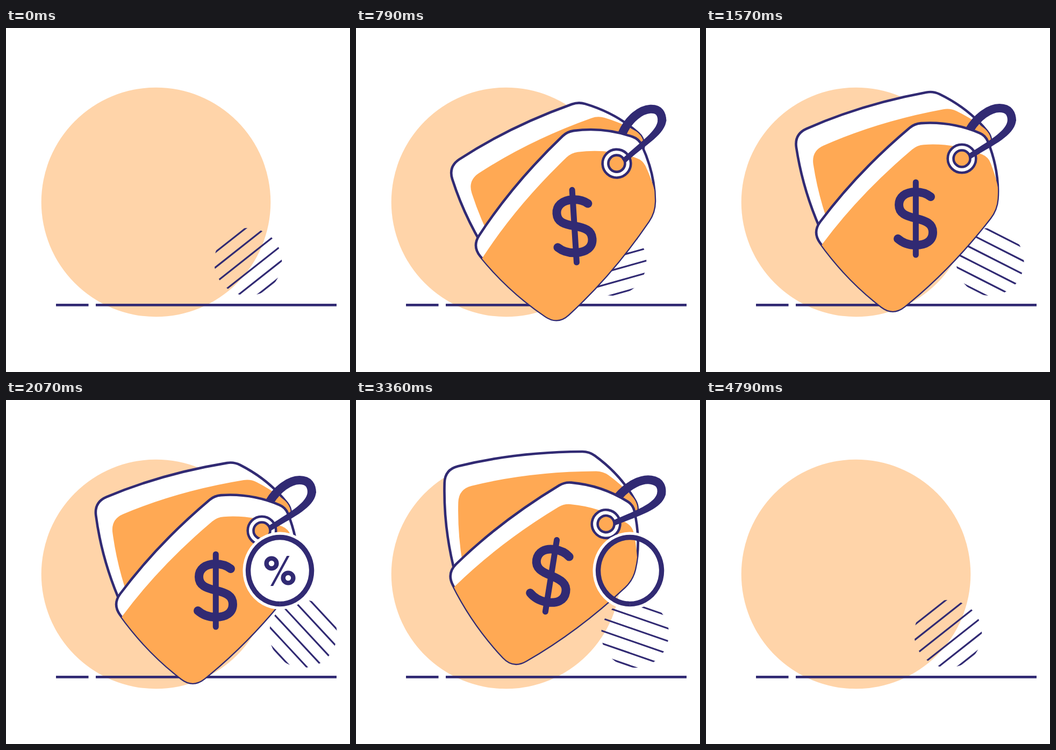
An HTML page that plays this animation: 640x640 px, repeating every 4870 ms.

```html
<!DOCTYPE html>
<html lang="en">
<head>
<meta charset="utf-8">
<title>Price tags</title>
<style>
  html, body { margin: 0; width: 100%; height: 100%; overflow: hidden; background: #fff; }
  svg { display: block; width: 100vw; height: 100vh; }
  .line { fill: none; stroke: #312a73; }
  .ink { fill: #312a73; }
  .paper { fill: #fff; }
  .orange { fill: #ffa954; }
  .edge { stroke: #312a73; stroke-width: 4.6; }
  .round { stroke-linecap: round; }
</style>
</head>
<body>
<svg viewBox="0 0 640 640">
  <defs>
    <path id="frontShape"/>
    <path id="backShape"/>
    <clipPath id="frontClip"><use href="#frontShape"/></clipPath>
    <clipPath id="backClip"><use href="#backShape"/></clipPath>
    <clipPath id="ballClip"><circle r="63"/></clipPath>
  </defs>

  <circle cx="279" cy="324" r="213.3" fill="#ffd4a9"/>
  <path class="line" stroke-width="4.8" d="M93 515.3H153.5M167 515.3H615"/>
  <g id="ball"><path id="hatch" class="line" stroke-width="3.2" clip-path="url(#ballClip)"/></g>

  <g id="tags">
    <g id="back">
      <use href="#backShape" class="paper edge"/>
      <g clip-path="url(#backClip)"><use href="#backShape" class="orange" x="31" y="32"/></g>
    </g>
    <path id="cordTop" class="line" stroke-width="16"/>
    <g id="front">
      <use href="#frontShape" class="paper edge"/>
      <g clip-path="url(#frontClip)"><use href="#frontShape" class="orange" x="5" y="40"/></g>
      <circle class="paper edge" cx="476" cy="243" r="26.3"/>
      <circle class="orange edge" cx="476" cy="243" r="15.5"/>
      <path class="line round" stroke-width="11" d="M390.3 287V422"/>
      <path class="line round" stroke-width="16" d="M418 314C408 306 398 305 390 305C370 305 359 315 359 329C359 345 372 350 390 354C410 359 422 364 422 380C422 396 409 404 390 404C376 404 366 400 357 392"/>
    </g>
    <path id="cordEnd" class="ink"/>
  </g>

  <g id="badge">
    <path class="trim" fill="none" stroke="#fff" stroke-width="8" pathLength="1" d="M509.5 385.5a65 68 0 1 1 .1 0"/>
    <g id="percent">
      <ellipse class="paper" cx="509.5" cy="317.5" rx="59" ry="62"/>
      <circle class="line" stroke-width="8.4" cx="494" cy="304" r="9.4"/>
      <circle class="line" stroke-width="8.4" cx="525" cy="331" r="9.4"/>
      <path class="ink" d="M522.5 290H527.5L497 346H492Z"/>
    </g>
    <path class="line trim" stroke-width="9.4" pathLength="1" d="M509.5 379.5a59 62 0 1 1 .1 0"/>
  </g>
</svg>
<script>
  const LOOP = 4870, FPS = 14;
  const $ = id => document.getElementById(id);
  const set = (id, name, value) => $(id).setAttribute(name, value);
  const smooth = u => u * u * (3 - 2 * u);
  const about = (x, y, s, r = 0) => `translate(${x} ${y}) scale(${s}) rotate(${r}) translate(${-x} ${-y})`;

  // Eased progress from 0 to 1 between two times.
  const ease = (t, from, to) => smooth(Math.min(1, Math.max(0, (t - from) / (to - from))));
  // Rises between a and b, falls between c and d.
  const pulse = (t, a, b, c, d) => ease(t, a, b) - ease(t, c, d);
  // Swings up to `high` at 400 ms, back past rest to `low`, then settles.
  const sway = (t, high, low, turn, end) =>
    high * ease(t, 0, 400) + (low - high) * ease(t, 400, turn) - low * ease(t, turn, end);

  // Closed outline through corners [x, y, rounding], each side bowed outwards.
  function outline(corners, bow = 8) {
    const toward = ([x, y, r], [cx, cy]) => {
      const k = r / Math.hypot(cx - x, cy - y);
      return [x + (cx - x) * k, y + (cy - y) * k];
    };
    const parts = corners.map((a, i) => {
      const b = corners[(i + 1) % corners.length];
      const dx = b[0] - a[0], dy = b[1] - a[1], k = 2 * bow / Math.hypot(dx, dy);
      const c = [(a[0] + b[0]) / 2 + dy * k, (a[1] + b[1]) / 2 - dx * k];
      return `${toward(a, c)}Q${c} ${toward(b, c)}Q${b.slice(0, 2)} `;
    });
    return `M${parts.join('')}${parts[0].split('Q')[0]}Z`;
  }

  // The cord follows the eyelet; each point takes the share w of its shift.
  function drawCord(swing) {
    const p = (x, y, w) => `${x - 2.15 * swing * w} ${y - 2.5 * swing * w} `;
    set('cordTop', 'd', `M${p(490, 190, .7)}C${p(505, 165, .35)}${p(528, 149, .3)}${p(546, 149, .2)}` +
      `S${p(569, 160, .05)}${p(569, 173, .05)}`);
    set('cordEnd', 'd', `M${p(577, 170, .05)}C${p(576, 200, 0)}${p(532, 219, .1)}${p(493, 243, 1)}` +
      `L${p(487, 235, 1)}C${p(530, 208, .2)}${p(561, 190, .05)}${p(561, 170, .05)}Z`);
  }

  set('frontShape', 'd', outline([[198, 380, 24], [388, 178, 12], [520, 200, 12], [541, 338, 20], [348, 535, 27]]));
  set('backShape', 'd', outline([[164, 190, 25], [424, 115, 13], [534, 206, 18], [440, 350, 20], [224, 402, 22]]));
  set('hatch', 'd', Array.from({ length: 6 }, (_, i) => `M-70 ${(i - 2.33) * 22.2}H70`).join(''));
  const trims = document.querySelectorAll('.trim');

  function draw(t) {
    const roll = pulse(t, 0, 2400, 2400, 4750);
    set('ball', 'transform', `translate(${450.3 + 108 * roll} 435) rotate(${-38.3 + 90 * roll})`);

    const size = pulse(t, 0, 380, 3640, 4000);
    const spin = 36 * (ease(t, 0, 380) - 1) + 22 * ease(t, 3150, 3620) - 58 * ease(t, 3640, 4000);
    const swing = sway(t, 11, -3.6, 800, 1400);
    set('tags', 'display', size > .002 ? 'inline' : 'none');
    set('tags', 'transform', about(549, 168, size, spin));
    set('back', 'transform', `rotate(${sway(t, 30, -16.5, 900, 1700)} 543 182)`);
    set('front', 'transform', `rotate(${swing} 628 103)`);
    drawCord(swing);

    const ring = pulse(t, 1600, 1900, 3360, 3700), full = pulse(t, 1800, 2070, 3070, 3400);
    set('badge', 'display', ring > .002 ? 'inline' : 'none');
    trims.forEach(p => p.setAttribute('stroke-dasharray', ring < 1 ? `${ring} 2` : 'none'));
    set('percent', 'display', full > .002 ? 'inline' : 'none');
    set('percent', 'transform', about(506, 378, full));
  }

  // The picture advances in whole steps of 1/14 s.
  function tick() {
    const t = performance.now() % LOOP;
    const step = Math.min(67, Math.floor((t + 5) * FPS / 1000));
    draw(step * 1000 / FPS);
    requestAnimationFrame(tick);
  }
  tick();
</script>
</body>
</html>
```
